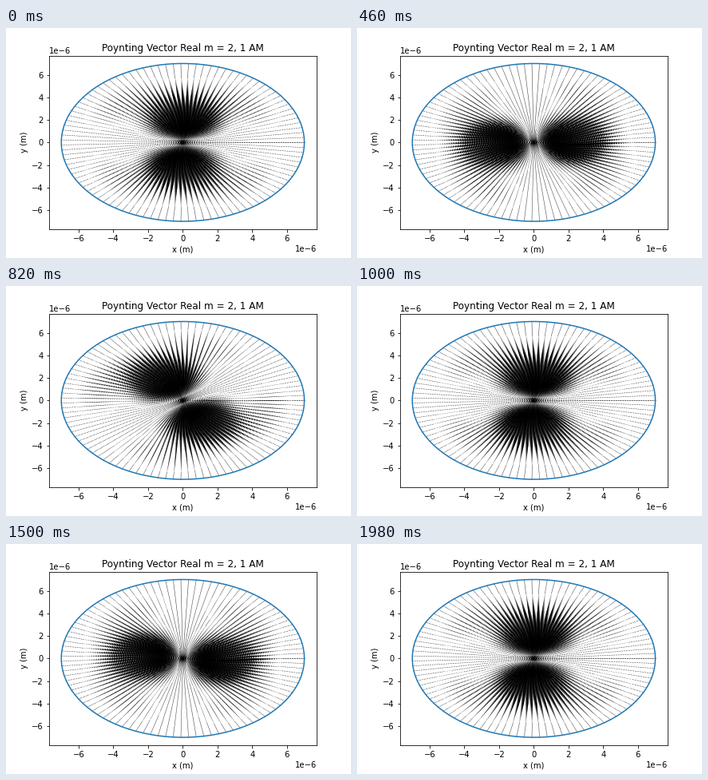
Recreate the animation shown at these times as a matplotlib script. Size 432x288 px, loop 2000 ms.

```python
import numpy as np
import matplotlib.pyplot as plt
from matplotlib.animation import FuncAnimation

FRAMES = 100
INTERVAL = 20
RADIUS = 7e-6
J1_ZERO = 3.8317  # first zero of J1, placed on the wall

plt.rcParams.update({"font.family": "DejaVu Sans", "font.size": 10})


def bessel(n, x):
    """Bessel function J_n from its integral form."""
    tau = np.linspace(0, 2 * np.pi, 64, endpoint=False)
    return np.cos(n * tau - np.multiply.outer(x, np.sin(tau))).mean(axis=-1)


radii = np.linspace(0, RADIUS, 100)
angles = np.linspace(0, 2 * np.pi, 100)
r, theta = np.meshgrid(radii, angles)
cos_t, sin_t = np.cos(theta), np.sin(theta)

kr = J1_ZERO * radii / RADIUS
j0, j1, j2 = (bessel(n, kr) for n in range(3))
radial = j1 * (j0 - j2) / 2   # J1 * J1'
swirl = j1 * (j0 + j2) / 2    # J1^2 / kr


def poynting(i):
    """Instantaneous E x H of a rotating mode, as x and y components."""
    psi = theta - np.pi / 2 + 2 * np.pi * i / (FRAMES - 1)
    s_r = -radial * np.sin(psi) * np.cos(psi)
    s_t = -swirl * np.cos(psi) ** 2
    return s_r * cos_t - s_t * sin_t, s_r * sin_t + s_t * cos_t


fig, ax = plt.subplots(figsize=(6, 4), dpi=72)
fig.subplots_adjust(left=0.125, right=0.9, bottom=0.125, top=0.88)

arrows = ax.quiver(r * cos_t, r * sin_t, *poynting(0))
ax.plot(RADIUS * np.cos(angles), RADIUS * np.sin(angles), color="C0", lw=1.5)

ticks = np.arange(-6, 7, 2) * 1e-6
limits = (-1.1 * RADIUS, 1.1 * RADIUS)
ax.set(xticks=ticks, yticks=ticks, xlim=limits, ylim=limits,
       xlabel="x (m)", ylabel="y (m)")
ax.set_title("Poynting Vector Real m = 2, 1 AM", y=1.0)


def update(i):
    arrows.set_UVC(*poynting(i))
    return (arrows,)


anim = FuncAnimation(fig, update, frames=FRAMES, interval=INTERVAL,
                     repeat=True, repeat_delay=0, blit=False)
plt.show()
```
